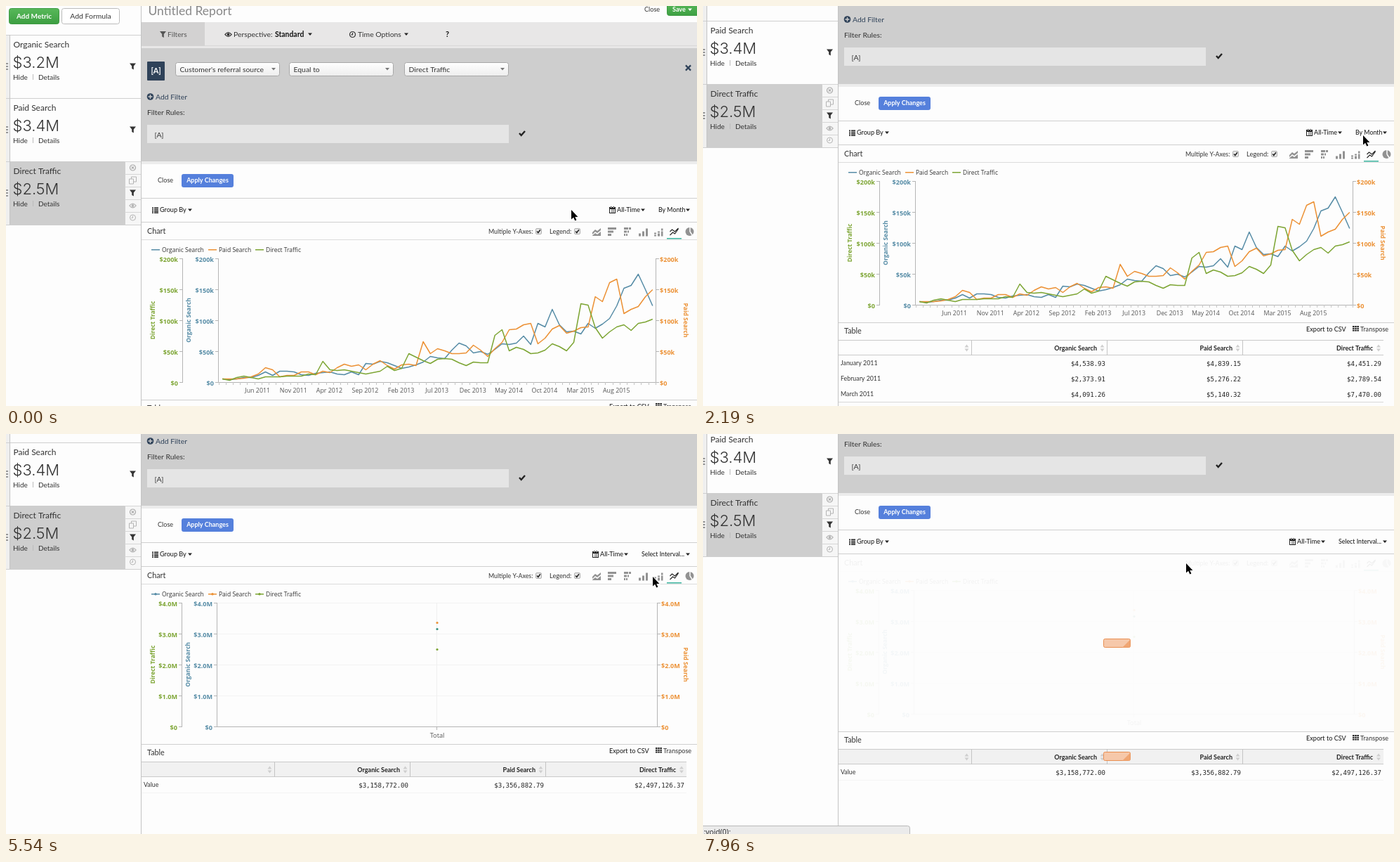
Recreate the animation shown at these times as an HTML page with a canvas. Size 984 px wide and 569 px high, loop 8000 ms.

```html
<!DOCTYPE html>
<html lang="en">
<head>
<meta charset="utf-8">
<title>Report builder</title>
<style>
html, body { margin: 0; width: 100%; height: 100%; overflow: hidden; background: #fdfdfd; }
canvas { display: block; }
</style>
</head>
<body>
<canvas id="stage" width="984" height="569"></canvas>
<script>
const g = document.getElementById('stage').getContext('2d');
const WHITE = '#fdfdfd', INK = '#333', NAVY = '#2f4259', GRAY = '#cecece', RULE = '#cfcfcf';
const BLUE = '#568ca6', ORANGE = '#ec9135', GREEN = '#7da534';
const LOOP = 8000, BASE = 535;

// Monthly heights in pixels above the axis
const organic = [5,4,5,7,7,10,15,10,16,16,15,11,10,13,14,15,12,11,15,11,27,26,30,28,24,20,22,25,29,37,
  35,34,46,56,52,42,44,40,47,55,54,56,66,54,84,79,104,82,72,73,69,84,77,83,91,109,134,138,154,132,109];
const paid = [5,5,5,6,8,12,21,18,8,10,10,15,15,11,16,14,21,26,23,25,18,26,31,24,19,25,26,24,58,41,
  48,45,41,41,42,53,46,37,48,57,75,76,82,84,55,63,76,81,70,73,78,79,122,115,142,147,98,104,108,122,132];
const direct = [5,3,7,9,7,5,8,8,8,9,9,9,12,11,30,18,17,18,16,14,12,14,16,23,17,20,41,36,31,27,
  33,34,33,28,24,29,28,28,67,75,45,50,47,41,42,46,55,51,45,57,112,110,78,63,72,79,82,74,84,86,90];

const steps = (t, list) => list.reduce((v, [at, to]) => t >= at ? to : v, 0);
const scrollAt = t => steps(t, [[800, 9], [1010, 32], [1180, 74], [1360, 110], [5540, 119], [5660, 130], [5800, 137]]);

// Key points: time, x, y
const path = [[0, 805, 290], [1600, 805, 290], [2190, 940, 184], [2390, 940, 184], [2740, 949, 185], [3010, 949, 185],
  [3450, 921, 203], [5800, 921, 203], [6000, 866, 153], [6750, 868, 162], [7220, 688, 184], [LOOP, 688, 184]];

function pointer(t) {
  const i = path.findIndex(p => p[0] > t), [a, ax, ay] = path[i - 1], [b, bx, by] = path[i];
  let k = (t - a) / (b - a);
  k = k * k * (3 - 2 * k);
  return [ax + (bx - ax) * k, ay + (by - ay) * k];
}

function text(s, x, y, size = 10.4, { color = INK, weight = 400, font = 'Lato', align = 'left' } = {}) {
  g.font = `${weight} ${size}px "${font}", sans-serif`;
  g.fillStyle = color;
  g.textAlign = align;
  g.fillText(s, x, y);
}
function rect(x, y, w, h, color) { g.fillStyle = color; g.fillRect(x, y, w, h); }
function round(x, y, w, h, r, fill, stroke) {
  g.beginPath();
  g.roundRect(x, y, w, h, r);
  g.fillStyle = fill;
  g.fill();
  if (stroke) { g.strokeStyle = stroke; g.lineWidth = 1; g.stroke(); }
}
function lines(d, color, width = 1, x = 0, y = 0) {
  g.save();
  g.translate(x, y);
  g.strokeStyle = color;
  g.lineWidth = width;
  g.stroke(new Path2D(d));
  g.restore();
}
function shape(d, x, y, color) {
  g.save();
  g.translate(x, y);
  g.fillStyle = color;
  g.fill(new Path2D(d), 'evenodd');
  g.restore();
}
function dot(x, y, r, color) {
  g.beginPath();
  g.arc(x, y, r, 0, 7);
  g.fillStyle = color;
  g.fill();
}
function shade(y, h, top, bottom) {
  const f = g.createLinearGradient(0, y, 0, y + h);
  f.addColorStop(0, top);
  f.addColorStop(1, bottom);
  return f;
}
const caret = (x, y, color = '#222') => shape('M-3-1.5H3L0 2z', x, y, color);
const funnel = (x, y, color) => shape('M-4.5-4.5h9L1.3-.5V4.5L-1.3 3V-.5z', x, y, color);
const clock = (x, y, color, w = 1.2) => lines('M4 0A4 4 0 1 1-4 0A4 4 0 1 1 4 0M0-2.5V.4H-2', color, w, x, y);
function eye(x, y, color) {
  shape('M-5.5 0Q0-7 5.5 0Q0 7-5.5 0zM-3.8 0Q0 4.6 3.8 0Q0-4.6-3.8 0z', x, y, color);
  dot(x, y, 1.9, color);
}

function metric(name, value, y, active) {
  rect(0, y, 192, 1, RULE);
  rect(0, y + 1, 5, 90, '#efefef');
  if (active) rect(6, y, 163, 90, GRAY);
  rect(5, y, 1, 90, '#c4c4c4');
  for (let i = 0; i < 3; i++) rect(0, y + 40 + i * 4, 3, 2, '#999');
  text(name, 10.5, y + 18, 12);
  text(value, 9.5, y + 47, 22, { weight: 300, font: 'Inter' });
  text('Hide', 10, y + 64, 10);
  rect(38, y + 56, 1, 8, '#bbb');
  text('Details', 46, y + 64, 10);
  if (!active) return funnel(180.5, y + 45, INK);
  rect(169, y, 23, 90, '#f6f6f6');
  rect(169, y, 1, 90, RULE);
  for (let i = 0; i < 5; i++) rect(169, y + i * 18, 23, 1, '#d6d6d6');
  lines('M4 0A4 4 0 1 1-4 0A4 4 0 1 1 4 0M-1.7-1.7L1.7 1.7M1.7-1.7L-1.7 1.7', '#aaa', 1.2, 180.5, y + 9);
  lines('M-5-2H1V5H-5zM-2-2V-5H5V2H1', '#b4b4b4', 1, 180.5, y + 27);
  funnel(180.5, y + 45, INK);
  eye(180.5, y + 63, '#b4b4b4');
  clock(180.5, y + 80, '#b4b4b4', 1);
}

function sidebar() {
  rect(192, -10, 1, 900, '#c4c4c4');
  round(4.5, 3.5, 71, 22, 3, shade(3, 22, '#58b95a', '#3d9f42'), '#3f9b43');
  text('Add Metric', 40, 18, 10, { weight: 700, color: '#fff', align: 'center' });
  round(79.5, 3.5, 82, 22, 3, '#fff', '#bbb');
  text('Add Formula', 120.5, 18, 10.4, { align: 'center' });
  metric('Organic Search', '$3.2M', 41);
  metric('Paid Search', '$3.4M', 131);
  metric('Direct Traffic', '$2.5M', 221, true);
  rect(0, 311, 192, 1, RULE);
}

function select(label, x) {
  round(x + .5, 80.5, 148, 19, 3, shade(80, 20, '#fff', '#ededed'), '#a8a8a8');
  text(label, x + 6.5, 93.5, 10.4);
  caret(x + 140, 89.5, '#777');
}

function filters() {
  text('Untitled Report', 202.5, 13, 17.5, { color: '#888' });
  text('Close', 909, 8, 9.1);
  round(941.5, -5.5, 60, 19, 3, shade(-5, 19, '#58b95a', '#3d9f42'), '#3f9b43');
  text('Save', 949, 8, 9, { weight: 700, color: '#fff' });
  caret(974, 5, '#fff');

  rect(193, 23, 791, 37, '#e8e7e7');
  rect(193, 56, 791, 1, '#d8d8d8');
  rect(193, 23, 90, 34, '#d3d2d2');
  funnel(223.5, 40.5, '#555');
  text('Filters', 230, 44, 10.2, { color: '#555' });
  eye(316.5, 40.5, INK);
  text('Perspective:', 324, 44);
  text('Standard', 383, 44, 10.4, { weight: 700, color: '#111' });
  caret(433, 40);
  clock(493.5, 40.5, INK);
  text('Time Options', 501, 44);
  caret(570, 40);
  text('?', 626, 44, 11, { weight: 700, color: '#111' });

  rect(193, 60, 791, 161, GRAY);
  rect(193, 221, 791, 4, '#ececec');
  round(201, 79, 25, 27, 1, NAVY);
  text('[A]', 213.5, 96, 11, { color: '#fff', weight: 700, align: 'center' });
  select("Customer's referral source", 241);
  select('Equal to', 403);
  select('Direct Traffic', 567);
  lines('M-3.6-3.6L3.6 3.6M3.6-3.6L-3.6 3.6', NAVY, 2.2, 971.5, 88);
  dot(205.5, 129, 4.8, NAVY);
  lines('M-3 0H3M0-3V3', GRAY, 1.4, 205.5, 129);
  text('Add Filter', 213, 133, 10.4, { color: NAVY });
  text('Filter Rules:', 201, 155);
  rect(201, 169, 515, 26, '#e5e5e5');
  text('[A]', 211.5, 187, 10.4);
  lines('M-4 0L-1.3 3L4-3', '#222', 2.4, 735, 181);
  text('Close', 216, 251, 9.1);
  round(250, 239, 74, 19, 3, '#5580dc');
  text('Apply Changes', 287, 251, 9, { weight: 700, color: '#fff', align: 'center' });
}

function toolbar(picked) {
  const dx = picked ? -24 : 0;
  rect(193, 273, 791, 1, RULE);
  for (let i = 0; i < 4; i++) {
    rect(208, 286.5 + i * 2.3, 2, 1.5, '#222');
    rect(211, 286.5 + i * 2.3, 6, 1.5, '#222');
  }
  text('Group By', 219, 293, 9.1, { color: '#111' });
  caret(262, 290);
  shape('M0 1H9V10H0zM1 4V9H8V4zM2 0H3.3V2H2zM5.7 0H7V2H5.7zM3.5 4H4.3V9H3.5zM5.7 4H6.5V9H5.7z', 859 + dx, 285, '#222');
  text('All-Time', 870 + dx, 293, 9.1, { color: '#111' });
  caret(907 + dx, 290);
  text(picked ? 'Select Interval...' : 'By Month', picked ? 905 : 929, 293, 8.8, { color: '#111' });
  caret(971, 290);
  rect(193, 307, 791, 1, RULE);
}

function checkbox(x) {
  round(x + .5, 316.5, 8, 8, 1.5, '#e6e6e6', '#b0b0b0');
  lines('M-2.4 0L-.7 2L2.4-2.2', '#222', 1.5, x + 4.5, 320.5);
}

function chartHeader() {
  text('Chart', 201, 323.5, 10.8);
  text('Multiple Y-Axes:', 687, 323.5, 8.8);
  checkbox(754);
  text('Legend:', 774, 323.5, 9.2);
  checkbox(809);
  const c = '#929292';
  shape('M-6 1L-2-3L1-1L6-5V-2L1 2L-2 0L-6 4zM-6 5.5L-2 2L1 4L6 0V6H-6z', 841, 321, c);
  shape('M-6-6H6V-3H-6zM-6-1.5H2V1.5H-6zM-6 3H-1V6H-6z', 863, 321, c);
  shape('M-5-6H1V-3H-5zM2-6H5V-3H2zM-5-1.5H-1V1.5H-5zM0-1.5H2V1.5H0zM-5 3H-3V6H-5zM-2 3H0V6H-2z', 885, 321, c);
  shape('M-6 2H-3V6H-6zM-1-1H2V6H-1zM4-5H7V6H4z', 907, 321.5, c);
  shape('M-6 4H-3V6H-6zM-6 1H-3V3H-6zM-1 2H2V6H-1zM-1-1H2V1H-1zM4-1H6.5V6H4zM4-5H6.5V-2H4z', 929, 321.5, c);
  lines('M-6 5L-2 1L1 3L6-4M-6 0L-3-3L1 0L6-5', '#222', 1.1, 951.5, 321);
  rect(941, 330, 21, 1.5, '#39b29d');
  dot(973.5, 321, 6, c);
  lines('M0 0V-7M0 0L4 6', WHITE, 1.5, 974, 321);
  rect(193, 332, 791, 1, '#dcdcdc');
}

function legend(x, name, color, marked) {
  rect(x, 346, 12, 1.5, color);
  if (marked) dot(x + 6, 346.7, 1.8, color);
  text(name, x + 15, 349.5, 8.5, { font: 'Open Sans' });
}

function axis(x, color, name, nameX, side, unit) {
  const style = { color, weight: 700, font: 'Open Sans', align: side < 0 ? 'right' : 'left' };
  rect(x, BASE - 176, 1, 176, '#b5b5b5');
  for (let i = 0; i < 5; i++) {
    const y = BASE - i * 44;
    rect(side < 0 ? x - 4 : x, y, 5, 1, '#b5b5b5');
    text(i ? unit(i) : '$0', x + side * 6, y + 4.5, 9.1, style);
  }
  g.save();
  g.translate(nameX, 447);
  g.rotate(side * Math.PI / 2);
  text(name, 0, 3, 8.5, { ...style, align: 'center' });
  g.restore();
}

function plot(values, color) {
  g.beginPath();
  values.forEach((v, i) => g.lineTo(308.2 + i * 10.21, BASE + .5 - v));
  g.strokeStyle = color;
  g.lineWidth = 1.5;
  g.lineJoin = 'round';
  g.stroke();
}

function chart(total, grid) {
  const left = total ? 300 : 302, right = total ? 927 : 925;
  legend(207, 'Organic Search', BLUE, total);
  legend(288, 'Paid Search', ORANGE, total);
  legend(355, 'Direct Traffic', GREEN, total);
  if (total || grid) {
    for (let i = 1; i < 5; i++) rect(left, BASE - i * 44, right - left, 1, '#f3f3f3');
    if (total) rect(613, BASE - 176, 1, 176, '#f0f0f0');
    else for (let i = 0; i < 12; i++) rect(Math.round(308 + i * 51), BASE - 176, 1, 176, '#f5f5f5');
  }
  const unit = i => total ? `$${i}.0M` : `$${i * 50}k`;
  axis(total ? 250 : 251, GREEN, 'Direct Traffic', 209, -1, unit);
  axis(left, BLUE, 'Organic Search', total ? 258.5 : 260, -1, unit);
  axis(right, ORANGE, 'Paid Search', 968, 1, unit);
  rect(left, BASE, right - left, 1, '#b5b5b5');
  const label = { font: 'Open Sans', color: '#555', align: 'center' };
  if (total) {
    rect(613, BASE, 1, 5, '#b5b5b5');
    text('Total', 614, 550.5, 9.2, label);
    dot(614, 387.5, 1.6, ORANGE);
    dot(614, 396.5, 1.6, '#35907f');
    dot(614, 425.5, 1.6, GREEN);
    return;
  }
  for (let i = 0; i <= 61; i++) rect(Math.round(302.5 + i * 10.2), BASE, 1, 4, '#c4c4c4');
  const names = ['Jun', 'Nov', 'Apr', 'Sep', 'Feb', 'Jul', 'Dec', 'May', 'Oct', 'Mar', 'Aug'];
  names.forEach((m, i) => text(`${m} ${2011 + Math.floor((5 + i * 5) / 12)}`, 358.2 + i * 51.1, 550, 8.9, label));
  plot(organic, BLUE);
  plot(paid, ORANGE);
  plot(direct, GREEN);
}

function table(total, shaded) {
  rect(193, 560, 791, 1, RULE);
  text('Table', 201, 576, 10.8);
  text('Export to CSV', 859, 573, 9.1, { color: '#111' });
  for (let i = 0; i < 9; i++) rect(925 + i % 3 * 3.2, 565 + Math.floor(i / 3) * 2.8, 2.5, 2, '#222');
  text('Transpose', 936, 573, 9.1);
  rect(193, 585, shaded, 22, '#f1f1f1');
  rect(193, 585, 776, 1, '#cacaca');
  rect(193, 606, 776, 1, '#cacaca');
  [383, 576, 769].forEach(x => rect(x - 1, 585, 1, 22, '#c4c4c4'));
  [375.5, 568.5, 761.5, 962].forEach(x => shape('M-3-1L0-5L3-1zM-3 1H3L0 5z', x, 596.5, '#cfcfcf'));
  ['Organic Search', 'Paid Search', 'Direct Traffic'].forEach((s, i) =>
    text(s, [561, 754, 954][i], 599.5, 9, { weight: 700, align: 'right', color: '#222' }));
  const rows = total ? [['Value', '$3,158,772.00', '$3,356,882.79', '$2,497,126.37']] : [
    ['January 2011', '$4,538.93', '$4,839.15', '$4,451.29'],
    ['February 2011', '$2,373.91', '$5,276.22', '$2,789.54'],
    ['March 2011', '$4,091.26', '$5,140.32', '$7,470.00']];
  rows.forEach(([name, ...cells], r) => {
    const y = 621 + r * 22.2;
    text(name, 196, y, 8.8);
    cells.forEach((s, i) => text(s, [573, 766, 966][i], y + .5, 9.05, { font: 'DejaVu Sans Mono', align: 'right', color: '#222' }));
  });
  rect(193, total ? 629 : 673, 776, 1, total ? '#f4f4f4' : '#d8d8d8');
}

function loader(y, age) {
  const x = 570, p = 45 - age * .0474, q = ((p % 60) + 60) % 60;
  round(x + .5, y - .5, 38, 12, 2, '#f6c8aa', '#e98f52');
  g.save();
  g.clip();
  shape('M0 12L12 0H30L18 12z', x + q, y, '#f0a673');
  g.restore();
}

function popup(x, y, w, h) { round(x + .5, y + .5, w - 1, h - 1, 3, '#fff', '#c8c8c8'); }

function overlays(t) {
  if (t >= 3010 && t < 3600) popup(759, 191, 223, 150);
  if (t >= 6480 && t < 7580) popup(644, 170, 250, 196);
  if ((t >= 3270 && t < 4300) || t >= 6100) {
    round(-5.5, 557.5, 300, 20, 3, '#ebebeb', '#b8b8b8');
    text(':void(0);', 1, 570, 10.5, { font: 'Open Sans', color: '#222' });
  }
  if (t >= 6100 && t < 6950) {
    g.globalAlpha = Math.min(1, (6950 - t) / 200);
    round(838, 119, 44, 18, 1, '#444');
    shape('M-3 0H3L0 3z', 859, 139, '#444');
    text('All-Time', 860, 131, 9, { weight: 700, color: '#fff', align: 'center' });
    g.globalAlpha = 1;
  }
}

function cursor(t) {
  const [x, y] = pointer(t), hand = t >= 6080 && t < 6750;
  const d = hand
    ? 'M3.2 1.2Q4.5-.2 5.8 1.2V5.6Q7.8 4.6 8.6 6Q10.4 5.2 11.2 6.7Q13 6.2 13.4 8V11Q13.4 13.5 11.8 16H5.2L.6 10.4Q.4 8 3.2 9.3z'
    : 'M0 0V13.6L3.1 10.7L5.3 15.6L7.4 14.6L5.3 9.9H9.4z';
  const px = hand ? 864 : x, py = hand ? 146 : y;
  lines(d, hand ? '#111' : '#fff', 1.6, px, py);
  shape(d, px, py, hand ? '#fff' : '#000');
}

function veil(t) {
  if (t < 4740) return steps(t, [[3600, .55], [3700, .92]]);
  if (t < 5090) return .92 * Math.max(0, 1 - (t - 4740) / 300);
  return steps(t, [[7580, .3], [7680, .65], [7780, .94]]);
}

function draw(now) {
  const t = now % LOOP, total = t >= 5200, fade = veil(t);
  rect(0, 0, 984, 569, WHITE);
  g.save();
  g.translate(0, -scrollAt(t));
  sidebar();
  filters();
  toolbar(t >= 3600);
  chartHeader();
  chart(total, t >= 4740);
  if (fade) {
    g.globalAlpha = fade;
    rect(193, 308, 791, 252, WHITE);
    g.globalAlpha = 1;
  }
  table(total, total ? 776 : t >= 4830 ? 415 : 0);
  if (fade > .5) loader(429, t - (total ? 7580 : 3620));
  if (t >= 7950) loader(590, t - 7580);
  g.restore();
  overlays(t);
  cursor(t);
  requestAnimationFrame(draw);
}
requestAnimationFrame(draw);
</script>
</body>
</html>
```
